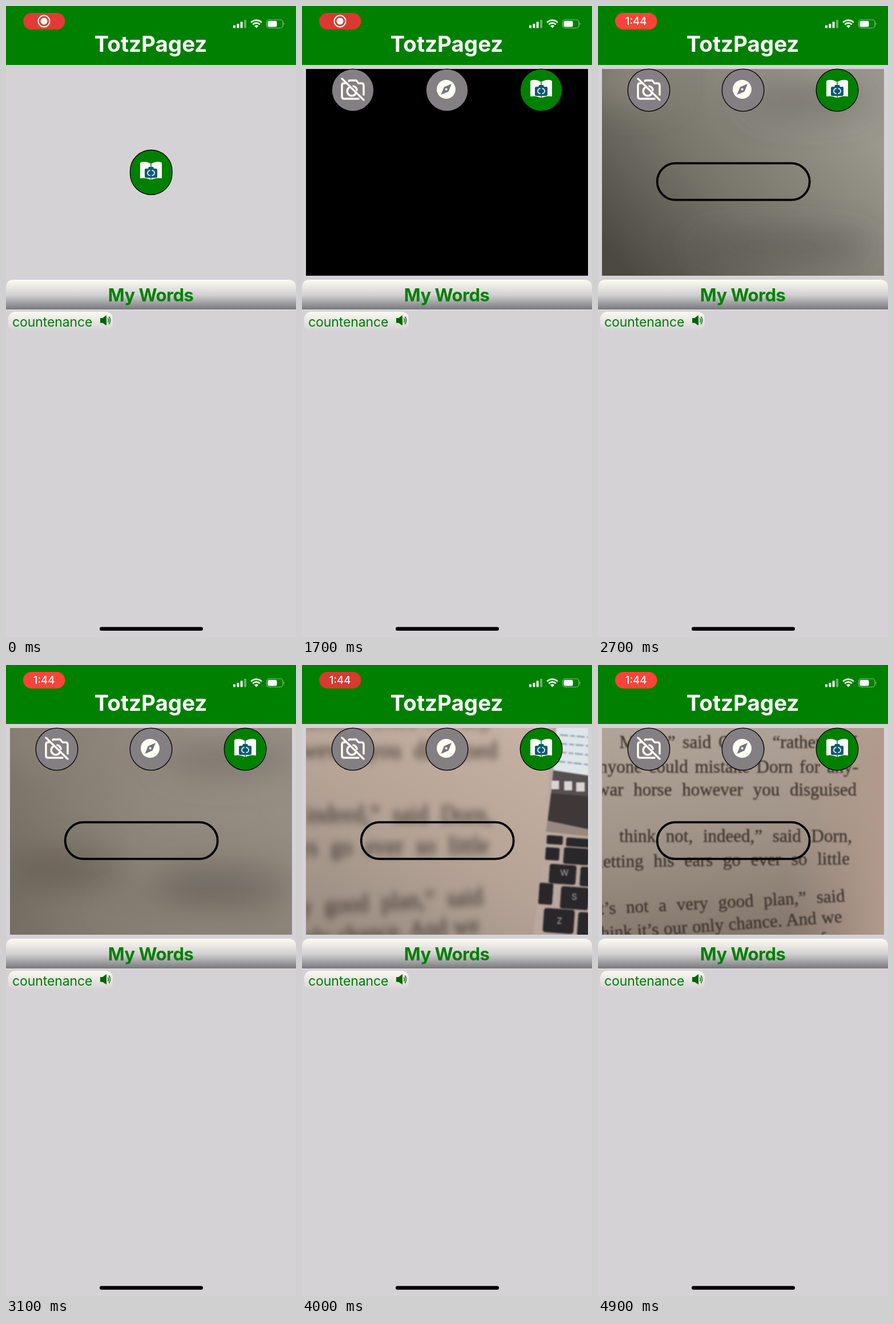
These frames come from a looping animation (508 by 1102 pixels, 5000 ms). An HTML page:

```html
<!DOCTYPE html>
<html lang="en">
<head>
<meta charset="utf-8">
<title>Word scanner</title>
<style>
  html, body { margin: 0; width: 100%; height: 100%; overflow: hidden; background: #d4d2d5; }
  svg { display: block; width: 100%; height: 100%; }
  text { font-family: Inter, "Open Sans", sans-serif; }
  .title { font-size: 38.5px; font-weight: 700; fill: #fff; text-anchor: middle; }
  .heading { font-size: 31px; font-weight: 700; letter-spacing: -.5px; fill: green; text-anchor: middle; }
  .word { font-size: 23px; letter-spacing: -.1px; fill: #007a08; }
  .clock { font-size: 18.5px; font-weight: 500; fill: #fff; text-anchor: middle; }
  .book text { font: 31px "Liberation Serif", serif; fill: #393029; fill-opacity: .9;
    stroke: #393029; stroke-width: .4; text-anchor: end; word-spacing: 10px; }

  .anim { animation: 5s linear infinite; }
  .pill { animation-name: pulse; animation-timing-function: ease-in-out; }
  .record { animation-name: record; }
  .clock { animation-name: clock; }
  .idle { animation-name: idle; }
  .camera { animation-name: camera; }
  .pale { animation-name: pale; }
  .grey { animation-name: grey; }
  .brown { animation-name: brown; }
  .page { animation-name: page; }
  .focus { animation-name: focus; }
  .book { animation-name: book; }
  .laptop { animation-name: laptop; }

  @keyframes pulse {
    0% { fill: #e03c34; }
    15%, 59% { fill: #ff443a; }
    37%, 81% { fill: #d63a31; }
    100% { fill: #fd433a; }
  }
  @keyframes record { 0%, 41% { opacity: 1; } 47%, 100% { opacity: 0; } }
  @keyframes clock { 0%, 40% { opacity: 0; } 47%, 100% { opacity: 1; } }
  @keyframes idle { 0%, 29.99% { opacity: 1; } 30%, 100% { opacity: 0; } }
  @keyframes camera { 0%, 29.99% { opacity: 0; } 30%, 100% { opacity: 1; } }
  @keyframes pale { 0%, 37% { opacity: 0; } 40%, 100% { opacity: 1; } }
  @keyframes grey { 0%, 43% { opacity: 0; } 53%, 100% { opacity: 1; } }
  @keyframes brown { 0%, 55% { opacity: 0; } 67%, 100% { opacity: 1; } }
  @keyframes page { 0%, 69% { opacity: 0; } 78%, 100% { opacity: 1; } }
  @keyframes focus { 0%, 83% { opacity: 0; } 96%, 100% { opacity: 1; } }
  @keyframes book {
    0%, 70% { transform: matrix(1.4, 0, 0, 1.5, -330, -150); filter: blur(13px); opacity: 0; }
    80% { transform: matrix(1.25, 0, 0, 1.38, -224, -152); filter: blur(4.5px); opacity: 1; }
    90% { transform: matrix(1.08, 0, 0, 1.12, -72, -48); filter: blur(3px); opacity: 1; }
    98%, 100% { transform: matrix(1, 0, 0, 1, 0, 0); filter: blur(1.2px); opacity: 1; }
  }
  @keyframes laptop {
    0%, 70% { transform: translate(-35px, 0); filter: blur(10px); opacity: 0; }
    80% { transform: translate(0, 0); filter: blur(1.1px); opacity: 1; }
    90%, 100% { transform: translate(115px, -15px); filter: blur(2px); opacity: 1; }
  }
</style>
</head>
<body>
<svg viewBox="0 0 508 1102" preserveAspectRatio="none">
  <defs>
    <linearGradient id="bar" x2="0" y2="1">
      <stop stop-color="#fdfcf1"/><stop offset=".5" stop-color="#d3d2d4"/><stop offset="1" stop-color="#78777b"/>
    </linearGradient>
    <linearGradient id="tag" x2="0" y2="1">
      <stop stop-color="#faf9ef"/><stop offset="1" stop-color="#d4d2d5"/>
    </linearGradient>
    <linearGradient id="paleTone" x1="0" y1=".8" x2="1" y2=".2">
      <stop stop-color="#a4b0a9"/><stop offset=".4" stop-color="#abb7ae"/><stop offset="1" stop-color="#bac5ba"/>
    </linearGradient>
    <linearGradient id="greyTone" x1="0" y1=".85" x2=".9" y2=".25">
      <stop stop-color="#4b4940"/><stop offset=".45" stop-color="#77746a"/><stop offset="1" stop-color="#9a978d"/>
    </linearGradient>
    <linearGradient id="brownTone" x1="0" y1=".2" x2="1" y2=".6">
      <stop stop-color="#8b8074"/><stop offset=".5" stop-color="#9b8f83"/><stop offset="1" stop-color="#94877c"/>
    </linearGradient>
    <linearGradient id="pageTone" x1="0" y1="1" x2=".8" y2="0">
      <stop stop-color="#988b80"/><stop offset=".5" stop-color="#b5a396"/><stop offset="1" stop-color="#c6b2a5"/>
    </linearGradient>
    <linearGradient id="focusTone" x1=".2" y1="0" x2=".35" y2="1">
      <stop stop-color="#b0a498"/><stop offset=".5" stop-color="#a19488"/><stop offset="1" stop-color="#85786d"/>
    </linearGradient>
    <linearGradient id="margin">
      <stop stop-color="#b09a8d" stop-opacity="0"/><stop offset="1" stop-color="#b29a8d"/>
    </linearGradient>
    <filter id="soft" x="-1" y="-1" width="3" height="3"><feGaussianBlur stdDeviation="28"/></filter>
    <clipPath id="view"><rect x="7" y="110" width="494" height="361"/></clipPath>

    <g id="scan">
      <path d="M-19-16Q-17-18-13-18Q-5-18 0-14Q5-18 13-18Q17-18 19-16V11Q8 9 0 14Q-8 9-19 11Z" fill="#fffffa"/>
      <path d="M0-14V14" stroke="green" stroke-width="1.5"/>
      <path d="M-9-6H-5L-4-9H4L5-6H9Q11-6 11-4V7Q11 10 9 10H-9Q-11 10-11 7V-4Q-11-6-9-6Z" fill="#055a78"/>
      <path d="M-1.5-3A4.5 4.5 0 0 0-1.5 6M1.5-3A4.5 4.5 0 0 1 1.5 6" fill="none" stroke="#eef5ee" stroke-width="1.8"/>
    </g>
    <rect id="key" rx="4" width="47" height="34" fill="#29272a" stroke="#766b67"/>
  </defs>

  <rect width="508" height="1102" fill="#d4d2d5"/>
  <rect width="508" height="103" fill="green"/>

  <!-- status bar -->
  <rect class="anim pill" x="30" y="12" width="73.5" height="29" rx="14.5"/>
  <g class="anim record" fill="#fff">
    <circle cx="66.5" cy="26.5" r="10" fill="none" stroke="#fff" stroke-width="2"/>
    <circle cx="66.5" cy="26.5" r="6"/>
  </g>
  <text class="anim clock" x="66.5" y="33">1:44</text>
  <g fill="#fff">
    <rect x="398" y="33.5" width="4" height="5" rx="1"/>
    <rect x="404.3" y="31" width="4" height="7.5" rx="1"/>
    <rect x="410.6" y="27.5" width="4" height="11" rx="1"/>
    <rect x="417" y="24" width="4" height="14.5" rx="1" opacity=".4"/>
    <path d="M438.500 38.500L434.800 34.700A5.300 5.300 0 0 1 442.200 34.700Z"/>
    <g fill="none" stroke="#fff" stroke-width="2.700">
      <path d="M432.300 32.200A8.800 8.800 0 0 1 444.700 32.200"/>
      <path d="M429.200 28.800A13.200 13.200 0 0 1 447.800 28.800"/>
    </g>
    <rect x="456.500" y="24" width="28.500" height="14.500" rx="4.500" fill="none" stroke="#fff" stroke-opacity=".5" stroke-width="1.200"/>
    <rect x="458.500" y="26" width="16" height="10.500" rx="2.500"/>
    <path d="M486.500 29Q489 31.200 486.500 33.500Z" opacity=".55"/>
  </g>
  <text class="title" x="253.500" y="79.500">TotzPagez</text>

  <!-- start button -->
  <g class="anim idle">
    <rect x="217.500" y="251.500" width="73.500" height="78" rx="36.700" fill="green" stroke="#000" stroke-width="1.300"/>
    <use href="#scan" x="254" y="290"/>
  </g>

  <!-- camera view -->
  <g class="anim camera">
    <g clip-path="url(#view)">
      <rect x="7" y="110" width="494" height="361"/>
      <rect class="anim pale" x="7" y="110" width="494" height="361" fill="url(#paleTone)"/>
      <g class="anim grey">
        <rect x="7" y="110" width="494" height="361" fill="url(#greyTone)"/>
        <g filter="url(#soft)">
          <ellipse cx="370" cy="165" rx="110" ry="28" fill="#6b675f" opacity=".6"/>
          <ellipse cx="320" cy="420" rx="160" ry="24" fill="#56534b" opacity=".6"/>
          <ellipse cx="60" cy="130" rx="70" ry="40" fill="#918b7f" opacity=".7"/>
        </g>
      </g>
      <g class="anim brown">
        <rect x="7" y="110" width="494" height="361" fill="url(#brownTone)"/>
        <g filter="url(#soft)">
          <ellipse cx="380" cy="385" rx="120" ry="34" fill="#5f5852" opacity=".8"/>
          <ellipse cx="110" cy="355" rx="100" ry="30" fill="#62584e" opacity=".75"/>
          <ellipse cx="400" cy="165" rx="130" ry="28" fill="#756b64" opacity=".7"/>
          <ellipse cx="230" cy="455" rx="220" ry="20" fill="#ab9e92" opacity=".7"/>
        </g>
      </g>
      <rect class="anim page" x="7" y="110" width="494" height="361" fill="url(#pageTone)"/>
      <g class="anim focus">
        <rect x="7" y="110" width="494" height="361" fill="url(#focusTone)"/>
        <rect x="330" y="110" width="171" height="361" fill="url(#margin)"/>
      </g>

      <g class="anim book">
        <text x="455" y="145" style="word-spacing:5px">Moffy,” said Orlith, “rather so I</text>
        <text x="456" y="188" style="word-spacing:4px">anyone could mistake Dorn for any-</text>
        <text x="453" y="228">war horse however you disguised</text>
        <text x="445" y="309">think not, indeed,” said Dorn,</text>
        <text x="441" y="348" transform="rotate(-.7 441 348)">letting his ears go ever so little</text>
        <text x="433" y="413" transform="rotate(-3 433 413)">It’s not a very good plan,” said</text>
        <text x="428" y="449" transform="rotate(-4 428 449)" style="word-spacing:1px">think it’s our only chance. And we</text>
        <text x="424" y="486" transform="rotate(-4 424 486)">and keep on until we are not far</text>
      </g>

      <g class="anim laptop">
        <path d="M437 100H520V490H402Q414 390 428 290Z" fill="#b9a79d"/>
        <path d="M446 100H520V196L440 184Z" fill="#dde6e9"/>
        <g stroke="#8c9da8" stroke-width="2.500" stroke-dasharray="14 4 8 3">
          <path d="M452 122L510 127M450 137L510 142M449 152L510 158M447 168L510 175"/>
        </g>
        <path d="M440 184L520 196V232L436 226Z" fill="#55504f"/>
        <g fill="#d8d6d4">
          <rect x="437" y="202" width="13" height="15"/>
          <rect x="459" y="203" width="14" height="16"/>
          <rect x="480" y="205" width="15" height="16"/>
        </g>
        <path d="M436 224L520 231V291L430 272Z" fill="#3e3938"/>
        <path d="M430 272L520 291V301L427 291Z" fill="#99887f"/>
        <use href="#key" transform="translate(429 297) rotate(4) scale(.6 .45)"/>
        <use href="#key" transform="translate(463 301) rotate(4) scale(.9 .45)"/>
        <use href="#key" transform="translate(427 318) rotate(4) scale(.52 .65)"/>
        <use href="#key" transform="translate(459 318) rotate(4) scale(.95 .85)"/>
        <use href="#key" transform="translate(434 347) rotate(4)"/>
        <use href="#key" transform="translate(488 352) rotate(4)"/>
        <use href="#key" transform="translate(416 380) rotate(4) scale(.52 1.100)"/>
        <use href="#key" transform="translate(454 386) rotate(4) scale(1.050 1.150)"/>
        <use href="#key" transform="translate(424 424) rotate(4) scale(1.150 1.250)"/>
        <use href="#key" transform="translate(484 431) rotate(4) scale(1.100 1.250)"/>
        <g fill="#b8b0ac" font-size="15">
          <text x="452" y="368">W</text><text x="472" y="410">S</text><text x="446" y="452">Z</text>
        </g>
      </g>
    </g>

    <rect x="103.700" y="274.700" width="267" height="64" rx="32" fill="none" stroke="#000" stroke-width="3.800"/>

    <g stroke="#000" stroke-width="1.300" fill="#837f83">
      <circle cx="89" cy="147" r="36.800"/>
      <circle cx="254" cy="147" r="36.800"/>
      <circle cx="419" cy="147" r="36.800" fill="green"/>
    </g>
    <g fill="none" stroke="#fffff4" stroke-width="3.500" stroke-linecap="round" stroke-linejoin="round">
      <path d="M70 127L108 164"/>
      <path d="M75 135H73Q70 135 70 139V158Q70 162 74 162H99"/>
      <path d="M82 131L83 130H95L99 135H104Q108 135 108 139V155"/>
      <path d="M83 142A8 8 0 1 0 94 153M90 140A8 8 0 0 1 96 147"/>
    </g>
    <circle cx="252.500" cy="145.500" r="16.500" fill="#fffff4"/>
    <path d="M262 136L256.500 149.500L243.500 155L249 141.500Z" fill="#777377"/>
    <circle cx="252.700" cy="145.500" r="2" fill="#fffff4"/>
    <use href="#scan" x="419" y="147"/>
  </g>

  <!-- word list -->
  <path d="M0 530V492Q0 478 14 478H494Q508 478 508 492V530Z" fill="url(#bar)"/>
  <path d="M0 531H508" stroke="#e4e3e5"/>
  <text class="heading" x="253.500" y="516">My Words</text>
  <rect x="4" y="534" width="183" height="34" rx="12" fill="url(#tag)"/>
  <text class="word" x="11" y="560">countenance</text>
  <path d="M165 545H169L176 540V558L169 553.500H165Z" fill="#006400"/>
  <path d="M178.500 545.500Q180.500 549 178.500 552.500M180.500 542.500Q184.500 549 180.500 555.500" fill="none" stroke="#006400" stroke-width="1.500"/>

  <rect x="164" y="1084.500" width="181" height="6.500" rx="3.250"/>
</svg>
</body>
</html>
```
